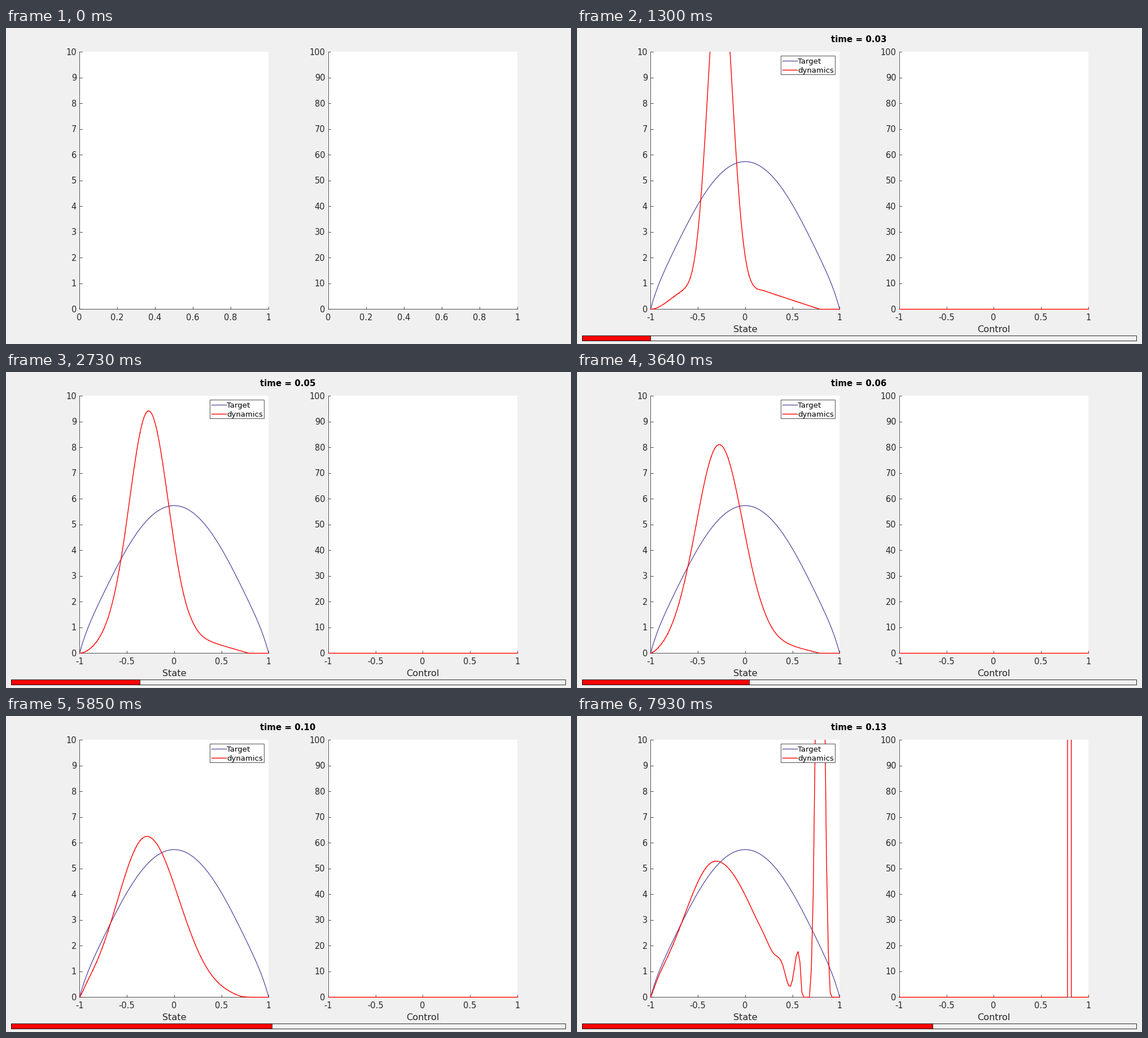
Write a matplotlib script that moves like this. It is 1001x559 px and loops after 8000 ms.

```python
import numpy as np
import matplotlib.pyplot as plt
from matplotlib.animation import FuncAnimation
from matplotlib.patches import Rectangle

W, H, DPI = 1001, 559, 100
STEP, TICK = 130, 40          # ms per picture change, ms per drawn frame
LAST = 8000 // STEP
INK, RED, PURPLE, GREY = "#262626", "#ff0000", "#5e4fa2", "#f0f0f0"
TOP, BOTTOM, WIDE = 42.5, 497.5, 335
LEFT, RIGHT = 130.4, 570.9
BAR0, BAR1 = 9.5, 991.5
plt.rcParams["font.family"] = "DejaVu Sans"


def pt(px):
    return px * 72 / DPI


# ---- curves -------------------------------------------------------------
x = np.linspace(-1, 1, 101)
target = 5.74 * np.cos(np.pi * x / 2) + 2.4 * x**8 * (1 - x**2)
pulse = np.where(np.abs(x - 0.8) < 0.01, 1e4, 0)


def spread(k):
    """A bell diffusing from a point, wider to the right, over a fading floor."""
    age = max(k - 1, 0.5)
    late = (age / 60)**2
    d = x + 0.265 + 0.045 * late
    var = 0.0165 * (age / 9)**1.22
    var = np.where(d < 0, var * (1 - 0.35 * late), var)
    walls = np.tanh((x + 1) / 0.07) * np.tanh(np.clip(0.72 - x, 0, 1) / 0.1)
    bell = 41 / np.sqrt(age) * np.exp(-d**2 / (2 * var)) * walls

    rise = np.clip((x + 1) / 0.4, 0, 1)
    rise = rise**2 * (3 - 2 * rise)
    fade = max(0, 1 - (age / 52)**2)
    floor = 0.75 * fade * rise * np.clip((0.79 - x) / 0.6, 0, 1)
    return (bell**1.25 + floor**1.25)**0.8


def kicked(k):
    """The state right after the control pulse: ringing up to a tall spike."""
    ring = 1.2 * np.exp((x - 0.55) / 0.09) * np.cos(2 * np.pi * (x - 0.55) / 0.19)
    spike = 25 * np.exp(-(x - 0.793)**2 / 0.0031) - 0.45
    return np.clip(np.where(x < 0.66, spread(k) + ring, spike), 0, None)


def bar_end(k):
    n = k - 10
    return 130.5 + 9.6 * n + 0.004 * n**2


# ---- stage --------------------------------------------------------------
fig = plt.figure(figsize=((W + 1e-3) / DPI, (H + 1e-3) / DPI), dpi=DPI, facecolor=GREY)
ax = fig.add_axes([0, 0, 1, 1])
# the tiny offset makes half-pixel lines snap to their own column
ax.set(xlim=(0.01, W + 0.01), ylim=(H, 0))
ax.axis("off")


def line(xs, ys, color=INK, width=0.8, z=2, **kw):
    return ax.plot(xs, ys, color=color, lw=pt(width), zorder=z, **kw)[0]


def text(px, py, s, size=14.67, ha="center", color=INK, **kw):
    return ax.text(px, py, s, fontsize=pt(size), ha=ha, va="baseline",
                   color=color, zorder=8, **kw)


def box(x0, y0, x1, y1, face, rim=None, z=1):
    return ax.add_patch(Rectangle((x0, y0), x1 - x0, y1 - y0, fc=face,
                                  ec=rim or "none", lw=pt(0.8) if rim else 0, zorder=z))


def to_y(v, top):
    return BOTTOM - np.asarray(v) * (BOTTOM - TOP) / top


def x_ticks(x0, labels):
    parts = []
    for i, s in enumerate(labels):
        px = x0 + WIDE * i / (len(labels) - 1)
        parts += [line([px, px], [BOTTOM, BOTTOM - 4.5]), text(px - 0.3, 516.5, s)]
    return parts


def panel(x0, top):
    box(x0 - 0.5, TOP - 0.5, x0 + WIDE, BOTTOM, "white")
    line([x0, x0], [TOP, BOTTOM])
    line([x0, x0 + WIDE], [BOTTOM, BOTTOM])
    for i in range(11):
        y = to_y(i, 10)
        line([x0, x0 + 4.5], [y, y])
        text(x0 - 5.5, y + 5.3, str(i * top // 10), ha="right")


def curve(x0, color, width, z, **kw):
    c = line(x0 + (x + 1) * WIDE / 2, np.full_like(x, BOTTOM), color, width, z, **kw)
    # leave room below the axis so the zero line keeps its full weight
    c.set_clip_path(Rectangle((x0 - 1, TOP - 0.5), WIDE + 2, BOTTOM - TOP + 3,
                              transform=ax.transData))
    return c


panel(LEFT, 10)
panel(RIGHT, 100)
intro, main = [], []
for x0 in (LEFT, RIGHT):
    intro += x_ticks(x0, ["0", "0.2", "0.4", "0.6", "0.8", "1"])
    main += x_ticks(x0, ["-1", "-0.5", "0", "0.5", "1"])

dots = dict(marker=".", markersize=pt(1.8), markeredgewidth=0)
goal = curve(LEFT, PURPLE, 1.35, 3)
goal.set_ydata(to_y(target, 10))
dyn = curve(LEFT, RED, 1.4, 4, **dots)
ctrl = curve(RIGHT, RED, 1.4, 4, **dots)
faint = line([872.5, 872.5], [415, 496], "#e2dada", 1, 3)

title = text(499.3, 25, "", 15, color="black", weight="bold")
fill = box(BAR0, 544.5, BAR0 + 1, 553.5, RED, "black", z=6)
main += [goal, dyn, ctrl, title, fill,
         box(BAR0, 544.5, BAR1, 553.5, "none", "black", z=5),
         text(298, 537.6, "State", 16.13),
         text(738.7, 537.6, "Control", 16.13),
         box(361.5, 49.5, 457.5, 82.5, "white", INK, z=6),
         line([364.5, 390], [58.5, 58.5], PURPLE, 1.35, 7),
         line([364.5, 377, 390], [74.5, 74.5, 74.5], RED, 1.4, 7, **dots),
         text(391.3, 63.3, "Target", 13.2, "left", "black"),
         text(391.3, 78.7, "dynamics", 13.2, "left", "black")]


def draw(i):
    k = min((i * TICK + 30) // STEP, LAST)
    hit = k == LAST
    for a in intro:
        a.set_visible(k == 0)
    for a in main:
        a.set_visible(k > 0)
    faint.set_visible(hit)
    done = bar_end(k) - BAR0
    fill.set_width(done)
    title.set_text(f"time = {0.21 * done / (BAR1 - BAR0):.2f}")
    dyn.set_ydata(to_y(kicked(k) if hit else spread(k), 10))
    ctrl.set_ydata(to_y(pulse * hit, 100))
    return []


anim = FuncAnimation(fig, draw, frames=8000 // TICK, interval=TICK,
                     init_func=lambda: [], repeat=True, repeat_delay=0, blit=False)
plt.show()
```
